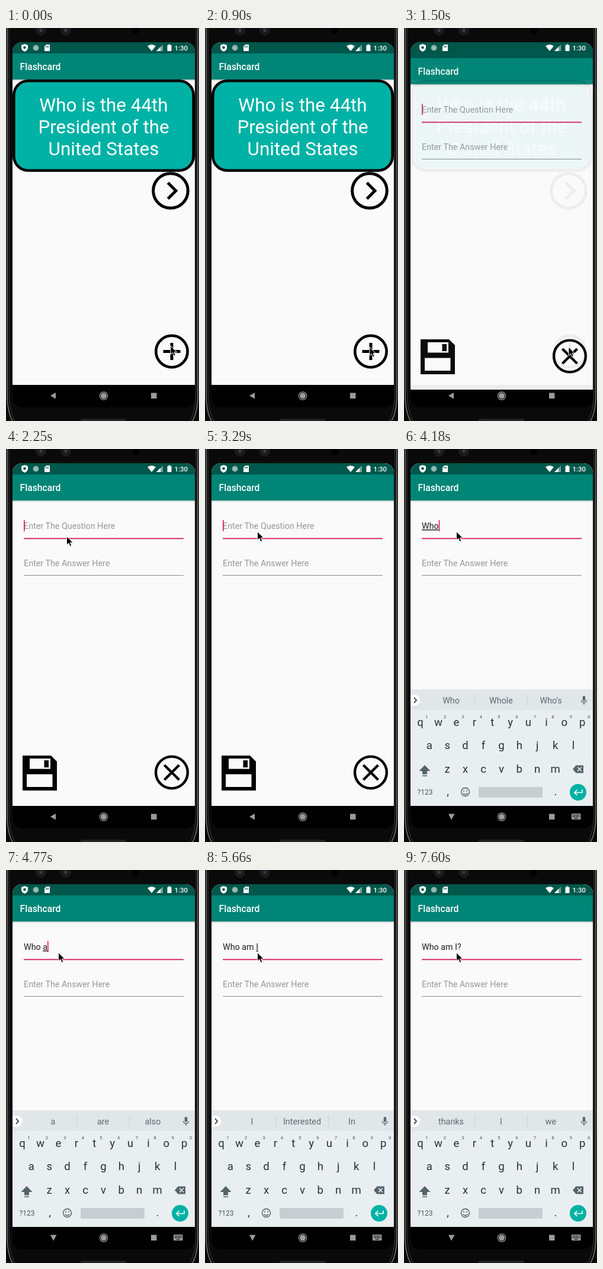
These frames come from a looping animation (326 px wide and 664 px high, 8000 ms). An HTML page:

```html
<!DOCTYPE html>
<html lang="en">
<head>
<meta charset="utf-8">
<title>Flashcard app</title>
<style>
html, body { margin: 0; width: 100%; height: 100%; overflow: hidden; background: #0a0a0a; }
svg { display: block; width: 326px; height: 664px; }
text { font-family: Roboto, sans-serif; white-space: pre; }
.title { font-size: 15.7px; font-weight: 500; fill: #fff; }
.card { font-size: 31.4px; fill: #fff; text-anchor: middle; }
.field { font-size: 14.3px; fill: #202020; }
.hint { font-size: 14.3px; fill: #979797; }
.key { font-size: 18.6px; fill: #24333a; text-anchor: middle; }
.num { font-size: 8px; fill: #4c5a61; text-anchor: middle; }
.sug { font-size: 14.3px; fill: #5d6a70; text-anchor: middle; }
.comp { text-decoration: underline; text-decoration-thickness: 1px; }
</style>
</head>
<body>
<svg viewBox="0 0 326 664">
  <defs>
    <clipPath id="screen"><rect x="11" y="24" width="308" height="617" rx="16"/></clipPath>
    <linearGradient id="shade" x2="0" y2="1">
      <stop stop-color="#000" stop-opacity=".22"/><stop offset="1" stop-color="#000" stop-opacity="0"/>
    </linearGradient>
    <g id="bars">
      <rect x="11" y="24" width="308" height="579" fill="#fafafa"/>
      <rect x="11" y="87" width="308" height="3" fill="url(#shade)"/>
      <rect x="11" y="24" width="308" height="19" fill="#00574b"/>
      <rect x="11" y="43" width="308" height="44" fill="#008577"/>
      <text class="title" x="23.5" y="71">Flashcard</text>
    </g>
    <g id="edge" fill="none">
      <path d="M2 0V618Q2 648 11 664" stroke="#777" stroke-width="1.5"/>
      <path d="M5 0V616Q5 644 15 664" stroke="#3c3c3c"/>
    </g>
  </defs>

  <!-- phone body -->
  <rect width="326" height="664" fill="#0a0a0a"/>
  <use href="#edge"/>
  <use href="#edge" transform="translate(326 0) scale(-1 1)"/>
  <g fill="#17191b" stroke="#26282b">
    <circle cx="59" cy="4" r="8"/><circle cx="101" cy="4" r="8"/>
  </g>
  <g fill="#343940"><circle cx="59" cy="4" r="3"/><circle cx="101" cy="4" r="3"/></g>
  <circle cx="219" cy="4" r="6" fill="#000"/>
  <rect x="126" y="660" width="77" height="8" rx="2" fill="#222"/>

  <g clip-path="url(#screen)">
    <rect x="11" y="24" width="308" height="617" fill="#000"/>

    <g id="home">
      <use href="#bars"/>
      <rect x="13.3" y="89.3" width="303.4" height="151.4" rx="24" fill="#00b2a5" stroke="#000" stroke-width="4.6"/>
      <text class="card" x="165" y="141">Who is the 44th</text>
      <text class="card" x="165" y="177.8">President of the</text>
      <text class="card" x="165" y="214.6">United States</text>
      <g fill="none" stroke="#000" stroke-width="5">
        <circle cx="278" cy="275" r="29.3"/>
        <path d="M273.5 261.5L287 275L273.5 288.5"/>
        <circle cx="280" cy="546.5" r="26.7" stroke-width="4.6"/>
        <path d="M265.5 546.5H294.5M280 532V561"/>
      </g>
    </g>

    <g id="form">
      <use href="#bars"/>
      <text class="hint" id="hint" x="30" y="135">Enter The Question Here</text>
      <text class="field" x="30" y="135"><tspan id="done"></tspan><tspan id="comp" class="comp"></tspan></text>
      <rect id="caret" y="120" width="1.6" height="19" fill="#d81b60"/>
      <rect x="30" y="150.4" width="270" height="1.8" fill="#d81b60"/>
      <text class="hint" x="30" y="197.8">Enter The Answer Here</text>
      <rect x="30" y="213" width="270" height="1" fill="#8c8c8c"/>
      <path d="M28 518H76L86 528V577H28Z"/>
      <path d="M40 523H75V540.5H40ZM35 549.5H78.5V571H35Z" fill="#fafafa"/>
      <rect x="64.5" y="526" width="7.5" height="12"/>
      <g fill="none" stroke="#000" stroke-width="4.4">
        <circle cx="280" cy="546.5" r="26.9"/>
        <path d="M267.5 534L292.5 559M292.5 534L267.5 559"/>
      </g>
    </g>

    <g id="board">
      <rect x="11" y="406" width="308" height="197" fill="#e9eef1"/>
      <rect x="11" y="406" width="308" height="35" fill="#e1e6e9"/>
      <path d="M119.5 415V434M208.5 415V434" stroke="#cbd2d5"/>
      <path d="M11 415H18A9.5 9.5 0 0 1 18 434H11Z" fill="#fff"/>
      <path d="M17 420L21 424.5L17 429" fill="none" stroke="#222" stroke-width="1.6"/>
      <path d="M299.5 424A4.5 4.5 0 0 0 308.5 424M304 428.5V432" fill="none" stroke="#5d6a70" stroke-width="1.4"/>
      <rect x="301.7" y="417" width="4.6" height="9" rx="2.3" fill="#5d6a70"/>
      <g id="sugs"></g>
      <g id="keys"></g>
      <path d="M35 534L44.5 544H39V549.5H31V544H25.5ZM31 551.5H39V553H31Z" fill="#54646b"/>
      <path d="M285 541L290.5 534.5H303V547.5H290.5Z" fill="#54646b"/>
      <path d="M293 537.5L300 544.5M300 537.5L293 544.5" stroke="#e9eef1" stroke-width="1.6"/>
      <text class="key" x="35.5" y="584" style="font-size:12px;fill:#48575e">?123</text>
      <g fill="none" stroke="#48575e" stroke-width="1.3">
        <circle cx="103.5" cy="579.5" r="7"/><path d="M99.5 581.5Q103.5 586 107.5 581.5"/>
      </g>
      <g fill="#48575e"><circle cx="101" cy="577.5" r="1.1"/><circle cx="106" cy="577.5" r="1.1"/></g>
      <rect x="126" y="571" width="108" height="18" rx="2" fill="#c8cdd1"/>
      <circle cx="294" cy="580" r="14" fill="#00b2a5"/>
      <path d="M301 575.5V580.5H288.5M292.5 576L288 580.5L292.5 585" fill="none" stroke="#fff" stroke-width="1.7"/>
    </g>

    <!-- status icons -->
    <g fill="#fff">
      <path d="M31.5 27L37 29V33.5Q36.5 38 31.5 40Q26.5 38 26 33.5V29Z"/>
      <circle cx="31.5" cy="33" r="2.3" fill="#00574b"/>
      <circle cx="50.5" cy="33.5" r="5" opacity=".5"/>
      <circle cx="50.5" cy="33.5" r="3.2" opacity=".2"/>
      <path d="M68 28H74V39H65V31Z"/>
      <path d="M67.5 30.5V33M69.5 30V33M71.5 30V33" stroke="#00574b"/>
      <path d="M239 30.5Q246 25.5 253 30.5L246 39Z"/>
      <path d="M265 28V39H254Z" opacity=".45"/>
      <path d="M261 32V39H254Z"/>
      <path d="M274.5 27.5H277.5V29H279.5V39H272.5V29H274.5Z"/>
      <text x="284.5" y="38" font-size="11.5" font-weight="500">1:30</text>
    </g>

    <!-- navigation icons -->
    <g fill="#9b9b9b">
      <path id="back"/>
      <circle cx="165" cy="621.5" r="5"/>
      <circle cx="165" cy="621.5" r="6.7" fill="none" stroke="#9b9b9b" stroke-width="1.2"/>
      <rect x="245" y="616.5" width="9.5" height="9.5"/>
      <g id="ime">
        <rect x="283" y="616" width="15.5" height="10" rx="1"/>
        <path d="M285 618.5H297M285 621H297" stroke="#000" stroke-width="1.3" stroke-dasharray="1.5 1"/>
        <path d="M287.5 624H294" stroke="#000" stroke-width="1.2"/>
      </g>
    </g>
  </g>

  <path id="mouse" d="M0 0V14.5L3.4 11.5L5.7 17L8.3 16L6 10.7H10.5Z" stroke="#fff"/>
</svg>
<script>
const LOOP = 8000;
const $ = id => document.getElementById(id);

// [start, finished text, composing text, suggestions]
const typing = [
  [0, '', '', ['', '', '']],
  [3430, '', 'W', ['W', "What's", 'Who']],
  [3880, '', 'Wh', ['Wh', 'What', 'Who']],
  [4180, '', 'Who', ['Who', 'Whole', "Who's"]],
  [4330, 'Who ', '', ['is', 'are', 'was']],
  [4620, 'Who ', 'a', ['a', 'are', 'also']],
  [5210, 'Who am ', 'I', ['I', 'Interested', 'In']],
  [6110, 'Who am I?', '', ['thanks', 'I', 'we']]
];
const blinks = [2850, 3290, 5660, 6110, 6710, 7150, 7600];
const moves = [
  [0, 278, 537], [900, 278, 539], [1800, 256, 482], [1950, 204, 365],
  [2100, 146, 230], [2250, 102.5, 147.5], [2400, 88.5, 139.5]
];
const at = (list, t) => list.filter(s => s[0] <= t).pop();

function addText(parent, cls, x, y, str) {
  const el = document.createElementNS('http://www.w3.org/2000/svg', 'text');
  el.setAttribute('class', cls);
  el.setAttribute('x', x);
  el.setAttribute('y', y);
  el.textContent = str;
  return parent.appendChild(el);
}

const STEP = 30.4;
[['qwertyuiop', 27.6, 467.5], ['asdfghjkl', 42.8, 507], ['zxcvbnm', 73.2, 546.5]].forEach(([row, x, y], r) => {
  [...row].forEach((c, i) => {
    addText($('keys'), 'key', x + i * STEP, y, c);
    if (r === 0) addText($('keys'), 'num', x + i * STEP + 11, 455, (i + 1) % 10);
  });
});
addText($('keys'), 'key', 74, 585, ',');
addText($('keys'), 'key', 256, 585, '.');
const sugs = [79.5, 164, 248].map(x => addText($('sugs'), 'sug', x, 430, ''));

function show(id, on) { $(id).style.display = on ? '' : 'none'; }

function place(id, x, y, alpha = 1) {
  $(id).setAttribute('transform', `translate(${x} ${y})`);
  $(id).setAttribute('opacity', alpha);
}

function draw(t) {
  const opening = t < 1650, rising = t < 3730, keyboard = t >= 3580;
  show('form', t >= 1500);
  place('form', 0, opening ? 8 : 0, opening ? 0.95 : 1);

  const [, done, comp, words] = at(typing, t);
  $('done').textContent = done;
  $('comp').textContent = comp;
  show('hint', !done && !comp);
  const width = done || comp ? $('done').parentNode.getComputedTextLength() : 0;
  $('caret').setAttribute('x', 30 + width);
  show('caret', blinks.filter(b => b <= t).length % 2 === 0);

  show('board', keyboard);
  place('board', 0, rising ? 12 : 0, rising ? 0.78 : 1);
  sugs.forEach((el, i) => {
    el.textContent = words[i];
    el.style.fontWeight = words[i] === "What's" ? 700 : 400;
  });
  show('ime', keyboard);
  $('back').setAttribute('d', keyboard ? 'M75 616.5H85.5L80 626.5Z' : 'M75 621.3L84 616V626.6Z');

  const [, x, y] = at(moves, t);
  place('mouse', x, y);
}

const start = performance.now();
function tick() {
  draw((performance.now() - start) % LOOP);
  requestAnimationFrame(tick);
}
tick();
</script>
</body>
</html>
```
